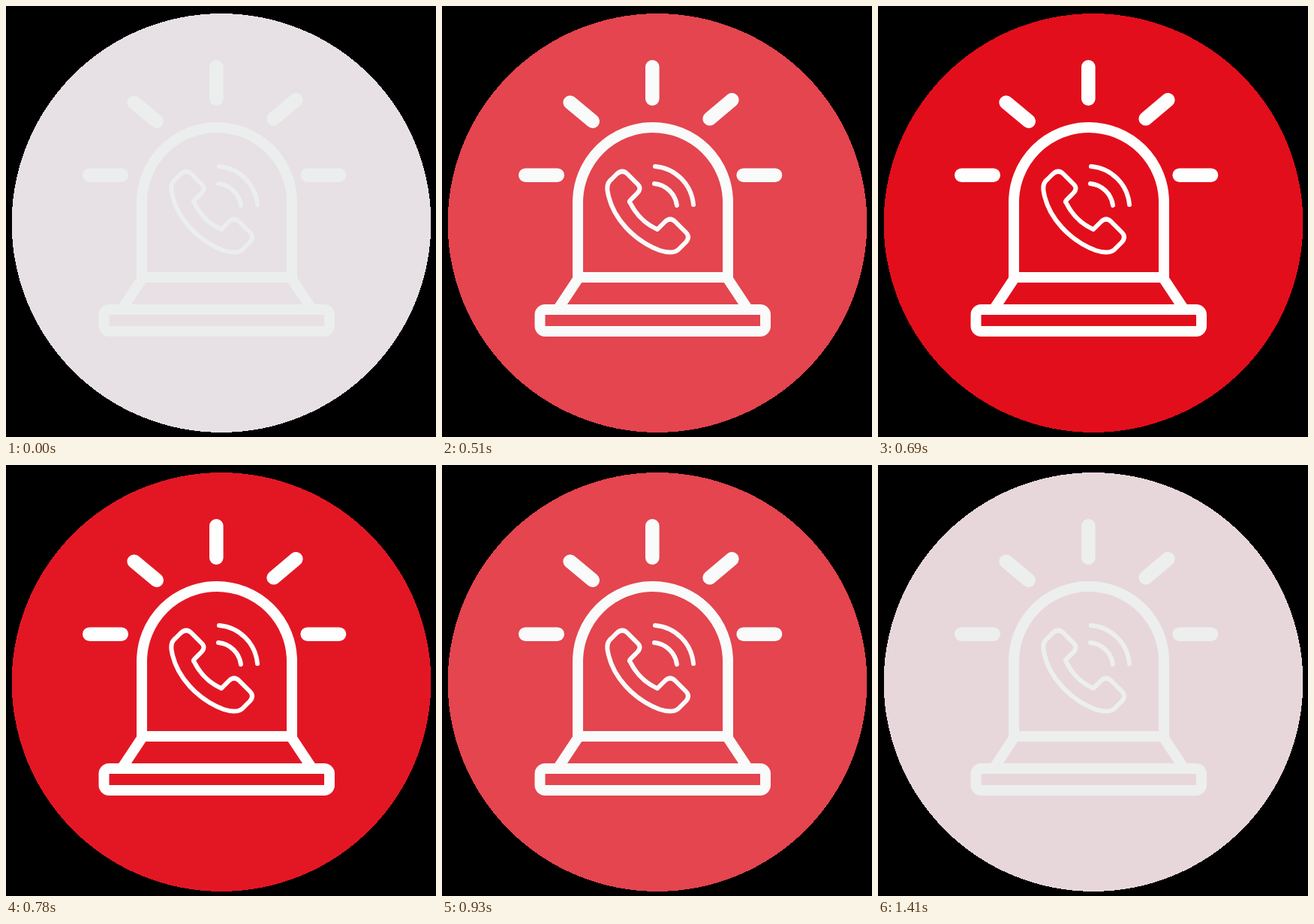
Recreate the animation shown at these times as an HTML page. Size 573x575 px, loop 1.44 s.

```html
<!DOCTYPE html>
<html lang="en">
<head>
<meta charset="utf-8">
<title>Emergency call</title>
<style>
  @property --level {
    syntax: "<number>";
    inherits: true;
    initial-value: 0;
  }
  html, body {
    margin: 0;
    width: 100%;
    height: 100%;
    overflow: hidden;
    background: #000;
  }
  svg {
    display: block;
    width: 100%;
    height: 100%;
    --mix: calc(var(--level) / 24 * 100%);
    animation: glow 1440ms infinite;
  }
  .disc {
    fill: color-mix(in srgb, #e30512 var(--mix), #e7e0e4);
    shape-rendering: crispEdges;
  }
  .icon {
    fill: none;
    stroke: color-mix(in srgb, #fff var(--mix), #ebeeed);
    stroke-width: 14;
  }
  .rays { stroke-width: 18.6; stroke-linecap: round; }
  .phone { stroke-width: 6; stroke-linecap: round; stroke-linejoin: round; }

  /* 24 levels up and down, 30 ms each, with two short holds near the peak */
  @keyframes glow {
    0%       { --level: 0;  animation-timing-function: steps(21); }
    43.75%   { --level: 21; animation-timing-function: step-end; }
    47.9166% { --level: 23; animation-timing-function: step-end; }
    50%      { --level: 24; animation-timing-function: step-end; }
    52.0833% { --level: 23; animation-timing-function: step-end; }
    54.1666% { --level: 22; animation-timing-function: step-end; }
    58.3333% { --level: 20; animation-timing-function: steps(20); }
    100%     { --level: 0; }
  }
</style>
</head>
<body>
<svg viewBox="0 0 573 575">
  <circle class="disc" cx="287" cy="289.5" r="279.4"/>
  <g class="icon">
    <path class="rays" d="M280.3 81.3V123.7M111.3 225.7H153.7M401.7 225.7H444
      M170.7 128.7L200.7 153.7M386.3 125.3L356.7 150.3"/>
    <path d="M181 362V262A100 100 0 0 1 381 262V362Z"/>
    <path d="M182.5 362L154 405M379.5 362L408 405"/>
    <rect x="130.5" y="405" width="300.5" height="29" rx="7"/>
    <g class="phone">
      <path d="M232 225Q240 217 247 224L260 237Q267 243 260 250L251 259Q249 261 251 263
        C259 279 271 291 287 298L297 288Q304 281 311 288L325 302Q331 308 325 315L315 325
        C309 330 299 329 290 326C256 313 227 283 221 249C219 240 222 234 226 231Z"/>
      <path d="M284 214A56.2 56.2 0 0 1 335 265M283 237A33.5 33.5 0 0 1 313 266"/>
    </g>
  </g>
</svg>
</body>
</html>
```
